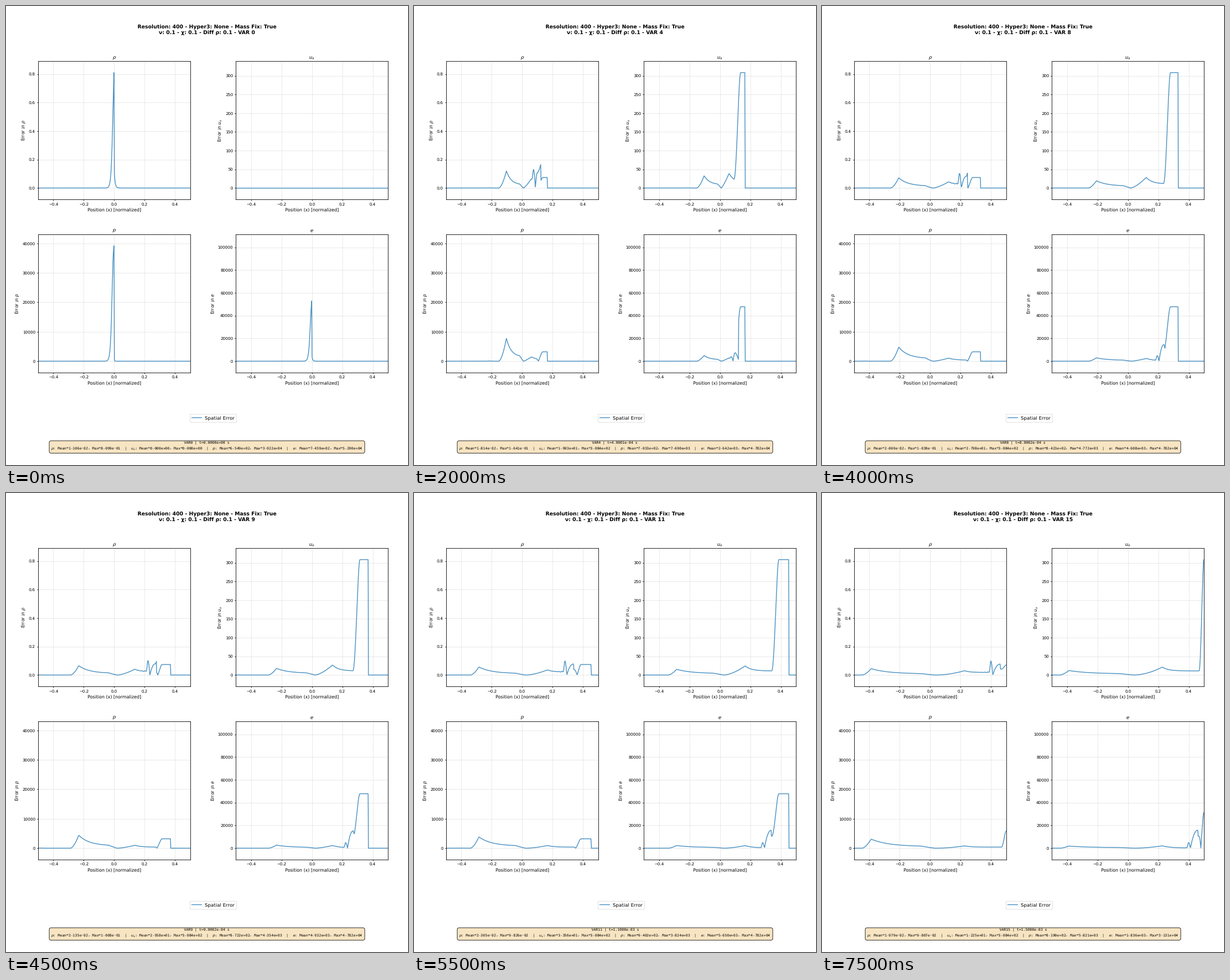
Write a matplotlib script that moves like this. It is 700 by 800 pixels and loops after 8000 ms.

```python
import numpy as np
import matplotlib.pyplot as plt
from matplotlib.animation import FuncAnimation

FRAMES, INTERVAL = 16, 500
X = np.linspace(-0.5, 0.5, 400)

plt.rcParams.update({
    "text.hinting": "none", "axes.linewidth": 1.2, "grid.linewidth": 1.2,
    "xtick.major.width": 1.2, "ytick.major.width": 1.2})

# start: first height and density-like ratio; left, bump: height at step 4 and
# decay power; top: plateau. Pairs in contact: late value and early surplus.
RHO = dict(label=r"$\rho$", peak=0.8099, start=(0.8099, 0.025),
           left=(0.121, 0.75), bump=(0.065, 0.57), bend=1.12,
           top=0.0742, wall_top=0.07,
           contact=dict(level=(0.62, 0.03), crest=(0.0985, 0.06),
                        hump=(0.077, 0.06), before=(0.077, 0.1),
                        after=(-0.042, 0.1), power=1))
VEL = dict(label=r"$u_x$", peak=308.4, start=(0, 0.5),
           left=(33, 0.76), bump=(39, 0.46), bend=0.85,
           top=308.4, wall_top=308.4, floor=11)
PRS = dict(label="$p$", peak=39220, start=(39220, 1.58e-4),
           left=(7797, 0.7), bump=(1450, 0.46), bend=1.12,
           top=3200, wall_top=5821, floor=-370)
ENE = dict(label="$e$", peak=101400, start=(52900, 0.0087),
           left=(5000, 0.75), bump=(2900, 0.25), bend=0.85,
           top=47820, wall_top=31310,
           contact=dict(level=(0.1, 0.05), crest=(5000, -2000),
                        hump=(15800, -15800), before=(15800, -15800),
                        after=(10500, 28500), power=2))
FIELDS = [RHO, VEL, PRS, ENE]


def part(x, lo, hi):
    return np.clip((x - lo) / (hi - lo), 0, 1)


def ramp(lo, hi, start):
    """S-curve over lo..hi, rescaled so that it is zero at start."""
    def s(x):
        t = part(x, lo, hi) ** 1.12
        return t * t * (3 - 2 * t)
    return np.clip((s(X) - s(start)) / (1 - s(start)), 0, 1)


def settle(pair, weight):
    late, surplus = pair
    return late + surplus * weight


def initial(height, ratio):
    """Difference of a sharp step and one smoothed in log space."""
    smooth = ratio ** (1 / (1 + np.exp(-2 * X / 0.0125)))
    gap = np.abs(np.where(X < 0, 1, ratio) - smooth)
    return height * gap / gap.max()


def wave_front(f, q, h, foot, crown, turn, top):
    sign = turn if f["floor"] < 0 else -1
    floor = abs(f["floor"])
    level = floor + (h - floor) * np.exp(-np.maximum(X - q, 0) / 0.04)
    rise = ramp(foot, crown, foot)
    return np.abs(top * rise - sign * level * (1 - rise))


def contact_front(f, n, q, h, foot, crown, turn, top):
    k = f["contact"]
    fresh, young = np.exp(-(n / 5) ** 2), np.exp(-(n / 8) ** 4)
    crest, hump = settle(k["crest"], fresh), settle(k["hump"], fresh)
    before = settle(k["before"], young)
    after = turn * settle(k["after"], young ** k["power"])

    contact = 0.0308 * n
    b = max(0.0295 * n - 0.0435, 0.0165 * n)
    zero = b + min(0.0125, 0.3 * (contact - b))

    rest, length = k["level"]
    level = h * (rest + (1 - rest) * np.exp(-np.maximum(X - q, 0) / length))
    ripple = (0.12 * h * np.cos(2 * np.pi * (X - b) / 0.02)
              * np.exp(np.minimum(X - b, 0) / 0.04))
    near = np.exp(-((X - b) / 0.0065) ** 2)
    approach = np.abs(level + ripple) * (1 - near) + crest * near
    fall = crest * np.cos(np.pi / 2 * part(X, b, zero))

    t, turning = part(X, zero, contact), min(0.97, 0.097 * n)
    arch = (hump * (1 - (1 - np.minimum(t / turning, 1)) ** 2.2)
            + (before - hump) * part(t, turning, 1) ** 1.5)
    rise = ramp(foot, crown, max(contact, foot))
    tail = np.abs(after + (top - after) * rise)
    return np.select([X < b, X < zero, X < contact], [approach, fall, arch], tail)


def profile(f, n):
    if n == 0:
        return initial(*f["start"])
    peak, origin, q, shock = np.array([-0.0259, 0.0022, 0.0151, 0.0413]) * n
    foot = min(max(0.0355 * n - 0.05, 0.0165 * n), 0.468)
    crown = min(max(0.0359 * n - 0.007, 0.034 * n), 0.5)
    at_wall = n >= 15
    turn = -1 if at_wall else 1
    top = f["wall_top"] if at_wall else f["top"]
    a, h = (v * (4 / n) ** power for v, power in (f["left"], f["bump"]))

    climb = a * part(X, peak - 0.047 - 0.0009 * n, peak) ** 1.7
    sound = -0.5 + abs(0.5 - 0.0545 * n)
    climb += 0.01 * a * np.exp(-((X - sound) / 0.015) ** 2)
    s = part(X, peak, origin)
    decay = a * ((0.22 + 0.78 * np.exp(-s / 0.29))
                 * np.minimum(1, (1 - s) / 0.22)) ** f["bend"]
    swell = h * part(X, origin, q) ** (1 + 0.06 * n)
    if "contact" in f:
        right = contact_front(f, n, q, h, foot, crown, turn, top)
    else:
        right = wave_front(f, q, h, foot, crown, turn, top)
    return np.select([X < peak, X < origin, X < q, X <= shock],
                     [climb, decay, swell, right], 0)


fig, axes = plt.subplots(2, 2, figsize=(14, 16), dpi=50)
fig.subplots_adjust(left=0.08, right=0.95, top=0.88, bottom=0.201,
                    wspace=0.3, hspace=0.25)
lines = []
for ax, f in zip(axes.flat, FIELDS):
    line, = ax.plot(X, np.zeros_like(X), color="tab:blue", lw=2, alpha=0.8,
                    label="Spatial Error")
    lines.append(line)
    ax.set_xlim(-0.5, 0.5)
    ax.set_ylim(-0.1 * f["peak"], 1.1 * f["peak"])
    ax.set_title(f["label"], fontsize=12)
    ax.set_xlabel("Position (x) [normalized]", fontsize=11)
    ax.set_ylabel("Error in " + f["label"], fontsize=11)
    ax.grid(True, alpha=0.3)

fig.legend(handles=lines[:1], loc="center", bbox_to_anchor=(0.515, 0.1025),
           fontsize=12)
title = fig.suptitle("", y=0.96, fontsize=13, fontweight="bold")
info = fig.text(0.5, 0.0405, "", ha="center", va="center", fontsize=9,
                family="DejaVu Sans Mono",
                bbox=dict(boxstyle="round,pad=0.5", facecolor="wheat",
                          alpha=0.8, lw=1.4))


def update(n):
    stats = []
    for line, f in zip(lines, FIELDS):
        y = profile(f, n)
        line.set_ydata(y)
        stats.append(f"{f['label']}: Mean={y.mean():.3e}, Max={y.max():.3e}")
    title.set_text("Resolution: 400 - Hyper3: None - Mass Fix: True\n"
                   f"ν: 0.1 - χ: 0.1 - Diff ρ: 0.1 - VAR {n}")
    info.set_text(f"VAR{n} | t={n * 1.00002e-4:.4e} s\n" + "  |  ".join(stats))
    return [*lines, title, info]


anim = FuncAnimation(fig, update, frames=FRAMES, interval=INTERVAL,
                     repeat=True, repeat_delay=0)
plt.show()
```
